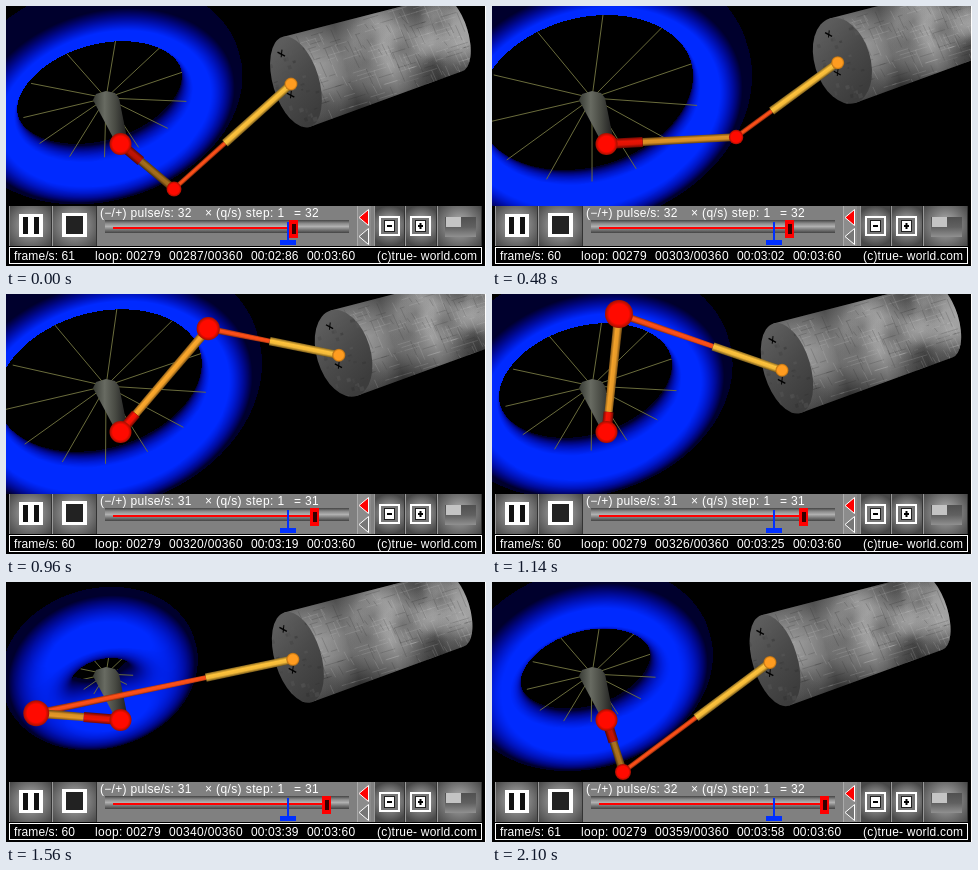
Write an HTML page with a canvas that moves like this. It is 480x260 px and loops after 2.16 s.

```html
<!DOCTYPE html>
<html lang="en">
<head>
<meta charset="utf-8">
<title>Crank and wheel</title>
<style>
html, body { margin: 0; width: 480px; height: 260px; overflow: hidden; background: #000; }
canvas { display: block; width: 480px; height: 260px; }
</style>
</head>
<body>
<canvas id="stage" width="480" height="260"></canvas>
<script>
const STEP = 60, COUNT = 36, SPAN = 38;
const ctx = document.getElementById('stage').getContext('2d');
const ring = document.createElement('canvas');
ring.width = 480; ring.height = 200;
const ringCtx = ring.getContext('2d');
const ringCache = [];
const pivot = { x: 114.5, y: 138 }, hub = { x: 100, y: 92 }, wheel = { x: 93, y: 86 };
const LEAN = -16 * Math.PI / 180;

// Key poses, joined by a smooth periodic curve
const keys = [0, 4, 13, 19, 23, 30, 35];
const pose = {
  hx: [168, 199, 260, 127, 38, 67, 131],
  hy: [183, 168, 74, 20, 90, 170, 190],
  hr: [7.5, 7, 9, 14, 14.5, 10, 8],
  bx: [285, 305, 373, 290, 280, 297, 278],
  rod: [.436, .387, .372, .577, .645, .63, .497],
  pin: [.38, .33, .22, .17, .3, .56, .42],
  lit: [.65, .75, 1, .95, .82, 1, .68],
  R: [115, 128, 143, 119, 85, 55, 98],
  r: [30, 29, 30, 30, 32, 38, 31],
  c: [.68, .72, .75, .71, .73, .64, .7]
};

function curve(v, t) {
  const n = keys.length;
  const time = k => keys[(k + n) % n] + SPAN * Math.floor(k / n);
  const val = k => v[(k + n) % n];
  const rate = k => (val(k + 1) - val(k)) / (time(k + 1) - time(k));
  const slope = k => {
    const a = time(k) - time(k - 1), b = time(k + 1) - time(k);
    return (rate(k - 1) * b + rate(k) * a) / (a + b);
  };
  let k = 0;
  while (k < n - 1 && t >= keys[k + 1]) k++;
  const w = time(k + 1) - time(k), s = (t - time(k)) / w, q = 1 - s;
  return val(k) * (1 + 2 * s) * q * q + val(k + 1) * s * s * (3 - 2 * s)
    + w * (slope(k) * s * q * q - slope(k + 1) * s * s * q);
}

function rect(x, y, w, h, fill) {
  ctx.fillStyle = fill;
  ctx.fillRect(x, y, w, h);
}

function poly(points, fill, stroke) {
  ctx.beginPath();
  points.forEach(([x, y]) => ctx.lineTo(x, y));
  ctx.closePath();
  if (fill) { ctx.fillStyle = fill; ctx.fill(); }
  if (stroke) { ctx.strokeStyle = stroke; ctx.lineWidth = 1; ctx.stroke(); }
}

function line(x1, y1, x2, y2, color, width = 1) {
  ctx.strokeStyle = color;
  ctx.lineWidth = width;
  ctx.beginPath();
  ctx.moveTo(x1, y1);
  ctx.lineTo(x2, y2);
  ctx.stroke();
}

function text(s, x, y, gap = .3) {
  ctx.font = '12px "Liberation Sans", Arial, sans-serif';
  ctx.letterSpacing = gap + 'px';
  ctx.fillStyle = '#fff';
  ctx.fillText(s, x, y);
}

function blend(g, colors) {
  colors.forEach((c, i) => g.addColorStop(i / (colors.length - 1), c));
  return g;
}

const tint = (r, g, b, k = 1) => `rgb(${r * k | 0},${g * k | 0},${b * k | 0})`;

function tube(x1, y1, x2, y2, w1, w2, color) {
  const len = Math.hypot(x2 - x1, y2 - y1), w = Math.max(w1, w2) / 2;
  ctx.save();
  ctx.translate(x1, y1);
  ctx.rotate(Math.atan2(y2 - y1, x2 - x1));
  const g = blend(ctx.createLinearGradient(0, -w, 0, w),
    [.5, 1, .95, .42].map(k => tint(...color, k)));
  poly([[0, -w1 / 2], [len, -w2 / 2], [len, w2 / 2], [0, w1 / 2]], g);
  ctx.restore();
}

function ball(x, y, r, inner, rim) {
  const g = ctx.createRadialGradient(x, y, r * .55, x, y, r);
  g.addColorStop(0, inner);
  g.addColorStop(.35, inner);
  g.addColorStop(1, rim);
  ctx.fillStyle = g;
  ctx.beginPath();
  ctx.arc(x, y, r, 0, 7);
  ctx.fill();
}

// Torus, one ray per pixel, lit by a lamp that sinks as the wheel grows
function renderRing({ R, r, c }) {
  const img = ringCtx.createImageData(480, 200), px = img.data;
  const s = Math.sqrt(1 - c * c), cl = Math.cos(LEAN), sl = Math.sin(LEAN);
  const reach = R * s + r, far = (R + r) ** 2;
  const lampX = 130 - wheel.x, lampY = 170 - wheel.y;
  const lu = lampX * cl + lampY * sl, lv = lampY * cl - lampX * sl, lz = Math.max(150, 620 - 4 * R);
  for (let y = 0; y < 200; y++) for (let x = 0; x < 480; x++) {
    const dx = x - wheel.x, dy = y - wheel.y, flat = dx * dx + dy * dy;
    if (flat > far) continue;
    const u = dx * cl + dy * sl, v = dy * cl - dx * sl;
    let z = reach;
    for (let k = 0; k < 60 && z > -reach; k++) {
      const h = v * s + z * c;
      const q = Math.sqrt(Math.max(.01, flat + z * z - h * h));
      const d = Math.sqrt((q - R) ** 2 + h * h) - r;
      if (d < .3) {
        const m = (q - R) / q;
        const nx = u * m / r, ny = ((v - h * s) * m + h * s) / r, nz = ((z - h * c) * m + h * c) / r;
        const ax = lu - u, ay = lv - v, az = lz - z;
        const cos = (nx * ax + ny * ay + nz * az) / Math.hypot(ax, ay, az);
        const lit = Math.min(1, Math.max(0, cos * 1.45 - .3)), i = (y * 480 + x) * 4;
        px[i + 1] = 42 * lit * lit;
        px[i + 2] = 45 + 210 * lit;
        px[i + 3] = 255;
        break;
      }
      z -= Math.max(d, .3);
    }
  }
  return img;
}

function spokes(p, front) {
  const rho = p.R - p.r;
  for (let k = 0; k < 12; k++) {
    const even = (k * 30 - 15) * Math.PI / 180, a = even + .2 * Math.cos(even);
    const u = rho * Math.cos(a), v = rho * p.c * Math.sin(a);
    if (front !== v > 0) continue;
    line(hub.x, hub.y, hub.x + u * Math.cos(LEAN) - v * Math.sin(LEAN),
      hub.y + u * Math.sin(LEAN) + v * Math.cos(LEAN), '#6a6c3c');
  }
}

function cone() {
  const g = blend(ctx.createLinearGradient(88, 0, 120, 0), ['#3c3f38', '#686b62', '#484a43', '#222']);
  poly([[87, 94], [90, 88], [100, 85], [109, 87], [113, 92], [121, 132], [110, 137]], g);
}

function drum(x, y) {
  const move = x - 285, k = 1 - move * .001, rx = 23 + move * .11;
  let seed = 7;
  const rnd = () => (seed = seed * 16807 % 2147483647) / 2147483647;
  ctx.save();
  ctx.translate(x + 5 * k, y - 2 * k);
  ctx.scale(k, k);
  ctx.rotate(-.295);
  ctx.save();
  ctx.beginPath();
  ctx.moveTo(0, -47);
  ctx.lineTo(162, -40);
  ctx.ellipse(162, -1, rx * .75, 39, 0, -Math.PI / 2, Math.PI / 2);
  ctx.lineTo(0, 47);
  ctx.closePath();
  ctx.fillStyle = blend(ctx.createLinearGradient(0, -47, 0, 47),
    ['#5c5c5c', '#808080', '#989898', '#8c8c8c', '#646464', '#343434']);
  ctx.fill();
  ctx.clip();
  rect(0, -50, 190, 100, blend(ctx.createLinearGradient(10, 0, 180, 0),
    ['rgba(255,255,255,.08)', 'rgba(0,0,0,.2)', 'rgba(255,255,255,.2)', 'rgba(0,0,0,.25)', 'rgba(255,255,255,.1)']));
  for (let i = 0; i < 16; i++) {
    const cx = 20 + rnd() * 160, cy = rnd() * 76 - 40, r = 12 + rnd() * 18;
    const v = rnd() > .5 ? 200 : 50;
    ctx.fillStyle = blend(ctx.createRadialGradient(cx, cy, 0, cx, cy, r),
      [`rgba(${v},${v},${v},.35)`, `rgba(${v},${v},${v},0)`]);
    ctx.fillRect(cx - r, cy - r, 2 * r, 2 * r);
  }
  for (let i = 0; i < 260; i++) {
    const cx = rnd() * 180, cy = Math.round(rnd() * 22) * 4 - 44, len = 5 + rnd() * 16;
    const color = rnd() > .5 ? 'rgba(210,210,210,.2)' : 'rgba(40,40,40,.22)';
    if (i % 2) line(cx, cy, cx + len, cy, color, .8);
    else line(cx, cy, cx + 2, cy + len, color, .8);
  }
  ctx.restore();
  ctx.beginPath();
  ctx.ellipse(0, 0, rx, 47, 0, 0, 7);
  ctx.fillStyle = blend(ctx.createLinearGradient(-20, -30, 20, 30), ['#5c5c5c', '#4a4a4a', '#3c3c3c']);
  ctx.fill();
  ctx.clip();
  for (let i = 0; i < 45; i++) {
    const v = 45 + rnd() * 50 | 0;
    rect(rnd() * 46 - 23, rnd() * 90 - 45, 2 + rnd() * 3, 1 + rnd() * 4, `rgba(${v},${v},${v},.4)`);
  }
  for (const [a, b] of [[-6, -31], [-9, 11]]) {
    line(a - 3, b - 3, a + 3, b + 3, '#000', 1.4);
    line(a + 2, b - 4, a - 1, b + 3, '#000');
  }
  ctx.restore();
}

function button(x, w) {
  const cx = x + w / 2;
  const g = ctx.createRadialGradient(cx, 218, 3, cx, 220, w * .65);
  rect(x, 200, w, 40, blend(g, ['#aaa', '#777', '#484848']));
  line(x + .5, 200, x + .5, 240, '#999');
  line(x + w - .5, 200, x + w - .5, 240, '#333');
}

function signBox(x, plus) {
  rect(x, 210, 21, 20, '#fff');
  rect(x + 2, 212, 17, 16, '#777');
  rect(x + 5, 214, 11, 12, '#222');
  rect(x + 6, 215, 9, 10, '#fff');
  rect(x + 8, 219, 5, 2, '#000');
  if (plus) rect(x + 9.5, 217, 2, 6, '#000');
}

function panel(i) {
  const n = 287 + 2 * i + (i >= 16) + (i >= 27);
  const pulse = i >= 16 && i < 33 ? 31 : 32;
  const pad = (v, w) => String(v).padStart(w, '0');
  const clock = v => `00:${pad(Math.floor(v / 100), 2)}:${pad(v % 100, 2)}`;

  rect(0, 200, 480, 60, '#000');
  rect(3, 200, 473, 40, '#808080');
  button(3, 43);
  button(46, 45);
  rect(13, 208, 24, 23, '#fff');
  rect(17, 211, 5, 17, '#111');
  rect(28, 211, 5, 17, '#111');
  rect(56, 207, 25, 24, '#fff');
  rect(60, 210, 17, 18, '#222');

  text('(−/+) pulse/s: ' + pulse, 94, 211);
  text('×', 199, 211);
  text('(q/s) step: 1', 210, 211, .4);
  text('= ' + pulse, 288, 211);

  rect(99, 214, 244, 13, blend(ctx.createLinearGradient(0, 214, 0, 227),
    ['#444', '#888', '#b0b0b0', '#777', '#444']));
  const x = Math.round(283 + (n - 287) * .625);
  rect(107, 221, x - 107, 2, '#f00');
  rect(281, 216, 2, 19, '#0030ff');
  rect(274, 234, 16, 5, '#0030ff');
  rect(x, 214, 9, 18, '#f00');
  rect(x + 3, 218, 4, 10, '#300');

  rect(352, 200, 13, 40, '#8c8c8c');
  poly([[353, 211.5], [362.5, 203.5], [362.5, 219.5]], '#f00', '#fff');
  poly([[353, 230.5], [362.5, 222.5], [362.5, 238.5]], '#777', '#fff');
  line(351.5, 200, 351.5, 240, '#aaa');
  button(368, 31);
  button(399, 32);
  button(431, 45);
  signBox(373, false);
  signBox(404, true);
  rect(439, 211, 31, 20, blend(ctx.createLinearGradient(0, 211, 0, 231), ['#505050', '#606060', '#909090']));
  rect(440, 211, 15, 10, '#c4c4c4');

  ctx.strokeStyle = '#fff';
  ctx.lineWidth = 1;
  ctx.strokeRect(3.5, 241.5, 472, 16);
  text('frame/s: ' + (i < 2 || i > 33 ? 61 : 60), 8, 254, .1);
  text('loop: 00279', 89, 254);
  text(pad(n, 5) + '/00360', 163, 254, .35);
  text(clock(n - 1), 245, 254, .1);
  text(clock(360), 301, 254, .2);
  text('(c)true- world.com', 371, 254, .2);
}

function scene(i) {
  const p = {};
  for (const k in pose) p[k] = curve(pose[k], i);
  const by = 78 - .352 * (p.bx - 285);
  const at = (x1, y1, x2, y2, f) => [x1 + (x2 - x1) * f, y1 + (y2 - y1) * f];

  rect(0, 0, 480, 260, '#000');
  spokes(p, false);
  ringCache[i] = ringCache[i] || renderRing(p);
  ringCtx.putImageData(ringCache[i], 0, 0);
  ctx.drawImage(ring, 0, 0);
  spokes(p, true);
  cone();
  drum(p.bx, by);

  const [sx, sy] = at(p.hx, p.hy, p.bx, by, p.rod);
  tube(p.hx, p.hy, sx, sy, 2 + p.hr * .4, 5, [255, 80, 25]);
  tube(sx, sy, p.bx, by, 8.5, 8, [255, 195, 60]);
  ball(p.bx, by, 6.5, '#ff9c20', '#b06a10');

  const [cx, cy] = at(pivot.x, pivot.y, p.hx, p.hy, p.pin);
  tube(cx, cy, p.hx, p.hy, 8, 6 + p.hr * .25, [255 * p.lit, 170 * p.lit, 45 * p.lit]);
  tube(pivot.x, pivot.y, cx, cy, 10, 10, [255 * (.3 + .7 * p.lit), 20, 5]);
  ball(pivot.x, pivot.y, 11, '#ff0a00', '#a01000');
  ball(p.hx, p.hy, p.hr, '#ff0a00', '#a01000');
  panel(i);
  rect(479, 0, 1, 260, '#fff');
}

let shown = -1;
const start = performance.now();
function tick() {
  const i = Math.floor((performance.now() - start) / STEP) % COUNT;
  if (i !== shown) scene(shown = i);
  requestAnimationFrame(tick);
}
tick();
</script>
</body>
</html>
```
